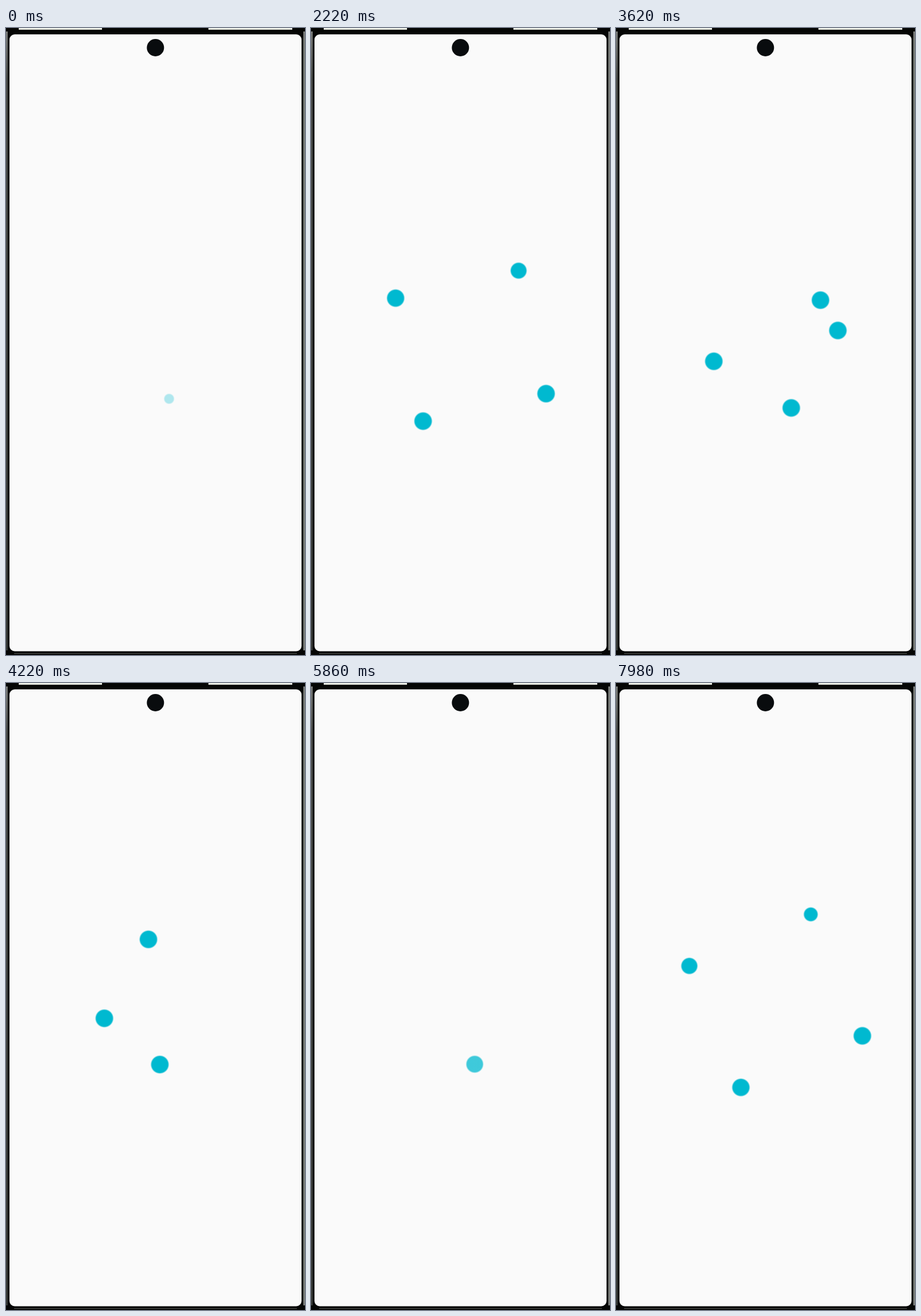
An HTML page with a canvas for the animation above (8000 ms loop, 517 px wide and 1084 px high).

```html
<!DOCTYPE html>
<html lang="en">
<head>
<meta charset="utf-8">
<title>Dot loader</title>
<style>
  html, body { margin: 0; width: 100%; height: 100%; overflow: hidden; background: #fafafa; }
  canvas { display: block; }
</style>
</head>
<body>
<canvas id="stage" width="517" height="1084"></canvas>
<script>
const W = 517, H = 1084;
const LOOP = 8000, CYCLE = 5980;
const CX = 276.4, CY = 549.6, ORBIT = 110.5, DOT = 15.1;
const ctx = document.getElementById('stage').getContext('2d');

const ramp = (t, from, to) => Math.min(1, Math.max(0, (t - from) / (to - from)));
const smooth = u => u * u * (3 - 2 * u);

// Monotone cubic curve through a few [time, value] keys.
function curve(keys) {
  const slope = i => (keys[i + 1][1] - keys[i][1]) / (keys[i + 1][0] - keys[i][0]);
  const tangent = i => {
    if (i === 0 || i === keys.length - 1) return 0;
    const a = slope(i - 1), b = slope(i);
    return 2 * a * b / (a + b);
  };
  return t => {
    let i = 0;
    while (i < keys.length - 2 && t > keys[i + 1][0]) i++;
    const [t0, v0] = keys[i], [t1, v1] = keys[i + 1];
    const h = t1 - t0, u = ramp(t, t0, t1), v = 1 - u;
    return v0 + (v1 - v0) * smooth(u) + h * u * v * (tangent(i) * v - tangent(i + 1) * u);
  };
}

// Turn of the whole ring in degrees.
const spin = curve([[600, 0], [2000, 22], [2847, 112], [3593, 256], [4807, 412], [5833, 536.5]]);

// How far the first dot has run ahead of its place in the ring.
function lead(t) {
  const s = Math.max(0, t - 2740) / 1000;
  return Math.min(270, 61 * s + 8.5 * s * s);
}

function orbit(t, exit) {
  const settle = 3.5 * (1 - smooth(ramp(t, 1300, 2000)));
  const swell = 51 * Math.sin(Math.PI * ramp(t, 1350, 2700)) ** 2;
  return ORBIT - settle + swell - 55 * exit ** 3;
}

function rect(color, x, y, w, h) {
  ctx.fillStyle = color;
  ctx.fillRect(x, y, w, h);
}

function disc(color, x, y, r) {
  ctx.fillStyle = color;
  ctx.beginPath();
  ctx.arc(x, y, r, 0, Math.PI * 2);
  ctx.fill();
}

// Dot with a slightly soft rim.
function softDisc(x, y, r) {
  const edge = Math.min(r, 1.2);
  const fill = ctx.createRadialGradient(x, y, r - edge, x, y, r + edge);
  fill.addColorStop(0, 'rgb(0 185 208)');
  fill.addColorStop(1, 'rgb(0 185 208 / 0)');
  disc(fill, x, y, r + edge);
}

function drawPhone() {
  rect('#050605', 0, 0, W, H);
  const side = ctx.createLinearGradient(0, 0, 0, H);
  side.addColorStop(0, '#7b7d7b');
  side.addColorStop(0.08, '#4a4d4b');
  side.addColorStop(1, '#353836');
  rect(side, 0, 6, 3, H - 14);
  rect('#777a77', W - 3, 6, 3, H - 14);
  rect('#e9ece4', 22, 0, 144, 3);
  rect('#e9ece4', 350, 0, 145, 3);
  rect('#6b6e6a', 14, H - 3, W - 28, 0.8);
  ctx.fillStyle = '#fafafa';
  ctx.beginPath();
  ctx.roundRect(6, 11, 505, 1066.5, 9);
  ctx.fill();
  disc('#090c0e', 258.4, 34, 14.9);
}

function drawDots(t) {
  const exit = ramp(t, 5752, 6078);
  const base = spin(t), ahead = lead(t), r = orbit(t, exit);
  ctx.globalAlpha = 1 - exit;
  for (let i = 0; i < 4; i++) {
    // The first dot sweeps up each dot it reaches.
    if (i > 0 && ahead > i * 90 - 2) continue;
    const a = (base + (i ? i * 90 : ahead)) * Math.PI / 180;
    const grow = 1 - (1 - ramp(t, 715 + i * 213, 1915 + i * 213)) ** 2;
    const size = DOT * grow * (1 - exit ** 2.3);
    if (size > 0) softDisc(CX + r * Math.cos(a), CY + r * Math.sin(a), size);
  }
  ctx.globalAlpha = 1;
}

// Three even poses per 140 ms, held for 20, 100 and 20 ms.
function poseTime(t) {
  const k = t % 140;
  const step = k < 20 ? 0 : k < 120 ? 1 : 2;
  return t - k + step * 140 / 3;
}

let start;
function frame(now) {
  start ??= now;
  const t = poseTime(Math.max(0, now - start) % LOOP);
  drawPhone();
  drawDots(t < 200 ? t + CYCLE : t > 6200 ? t - CYCLE : t);
  requestAnimationFrame(frame);
}
requestAnimationFrame(frame);
</script>
</body>
</html>
```
